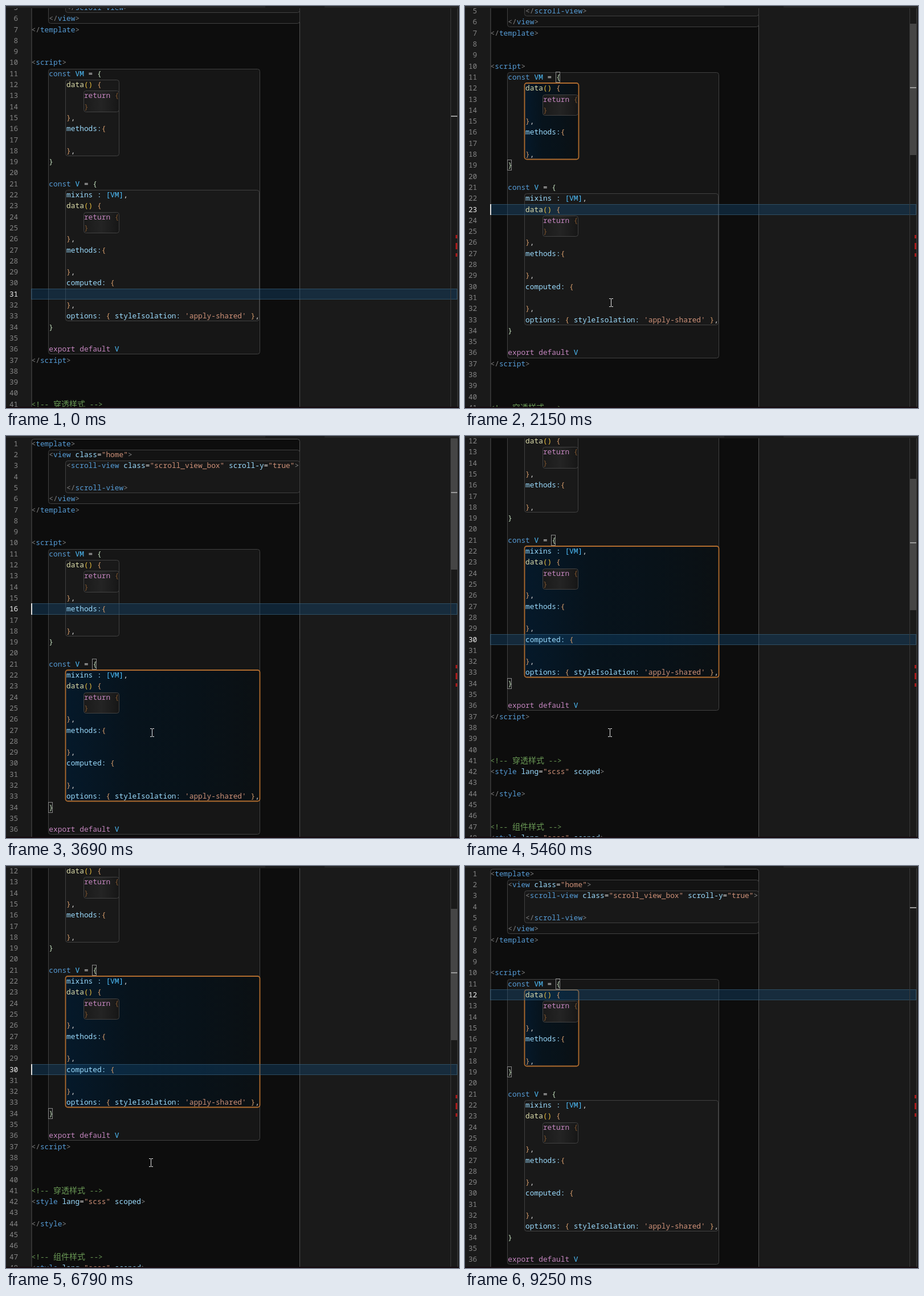
These frames come from a looping animation (795x704 px, 9.58 s). An HTML page with a canvas:

```html
<!DOCTYPE html>
<html lang="en">
<head>
<meta charset="utf-8">
<style>
html, body { margin: 0; width: 100%; height: 100%; overflow: hidden; background: #1a1a1a; }
canvas { display: block; }
</style>
</head>
<body>
<canvas id="stage" width="795" height="704"></canvas>
<script>
const ctx = document.getElementById('stage').getContext('2d');
const LOOP = 9580, W = 795, H = 704;
const LINE = 19.3, TOP = 3.85, LEFT = 44.5, CHAR = 7.7, BLINK = 533;
const MONO = '500 12.83px "Noto Sans Mono", monospace';
const CJK = '14px "Noto Sans CJK SC", "Noto Sans CJK", sans-serif';

const source = `<template>
    <view class="home">
        <scroll-view class="scroll_view_box" scroll-y="true">

        </scroll-view>
    </view>
</template>


<script>
    const VM = {
        data() {
            return {
            }
        },
        methods:{

        },
    }

    const V = {
        mixins : [VM],
        data() {
            return {
            }
        },
        methods:{

        },
        computed: {

        },
        options: { styleIsolation: 'apply-shared' },
    }

    export default V
<\/script>



<!-- 穿透样式 -->
<style lang="scss" scoped>

</style>


<!-- 组件样式 -->
<style lang="scss" scoped>`.split('\n');

const COLORS = {
  comment: '#6a9955', punct: '#808080', tag: '#569cd6', string: '#ce9178', attr: '#9cdcfe',
  flow: '#c586c0', constant: '#4fc1ff', func: '#dcdcaa', paren: '#e9bd3c', other: '#d4d4d4'
};
const BRACES = ['#c3dfbd', '#d49b6a', '#7d5530'];
const TOKEN = new RegExp([
  '(?<punct><\\/?|>)',
  '(?<tag>(?<=<\\/?)[\\w-]+|\\bconst\\b)',
  '(?<string>"[^"]*"|\'[^\']*\')',
  '(?<attr>[\\w-]+(?==)|\\bscoped\\b|\\w+\\s*:)',
  '(?<flow>\\b(?:return|export|default)\\b)',
  '(?<constant>\\bVM?\\b|[\\[\\]])',
  '(?<func>\\bdata\\b)',
  '(?<paren>[()])',
  '(?<brace>[{}])',
  '(?<other>\\S)'
].join('|'), 'g');

function tokenize(text) {
  if (text.startsWith('<!--')) {
    let x = LEFT;
    return text.split(/([\u4e00-\u9fff]+)/).map(part => {
      const wide = /[\u4e00-\u9fff]/.test(part);
      const token = { text: part, x, color: COLORS.comment, font: wide ? CJK : MONO };
      x += part.length * (wide ? 14 : CHAR);
      return token;
    });
  }
  const depth = text.search(/\S/) / 4 - 1;
  return [...text.matchAll(TOKEN)].map(m => {
    const kind = Object.keys(m.groups).find(k => m.groups[k]);
    return {
      text: m[0], x: LEFT + m.index * CHAR, font: MONO,
      color: kind === 'brace' ? BRACES[depth] : COLORS[kind]
    };
  });
}
const lines = source.map(tokenize);

// Nested blocks: left, right, first line, last line, fill
const blocks = [
  [45, 515.5, 1, 60, '#0d0d0d'],
  [74.5, 515.5, 2, 6, '#131313'],
  [104.5, 515.5, 3, 5, '#181818'],
  [74.5, 445.5, 11, 36, '#161616'],
  [104.5, 198.5, 12, 18, '#191919'],
  [104.5, 444.5, 22, 33, '#191919'],
  [136.5, 198.5, 13, 14, 'shade'],
  [136.5, 198.5, 24, 25, 'shade']
];

// Bracket pairs as [line, column], with the block that lights up
const scopes = {
  computed: { pair: [[30, 18], [32, 8]], block: null },
  VM: { pair: [[11, 15], [19, 4]], block: blocks[4] },
  V: { pair: [[21, 14], [34, 4]], block: blocks[5] }
};
const scopeOf = line => line === 31 ? scopes.computed : line < 20 ? scopes.VM : scopes.V;

// Caret jumps: time, line
const jumps = [
  [677 - 2 * BLINK, 31], [1610, 12], [2150, 23], [3220, 27], [3690, 16], [4920, 30],
  [5600, 27], [5990, 16], [6450, 27], [6790, 30], [7250, 23], [7650, 12]
];
const pointerPath = [
  [130, 626, 663], [270, 95, 446], [470, 95, 446], [800, 245, 526], [950, 256, 519],
  [4580, 256, 519], [4700, 254, 519], [8120, 254, 519], [8680, 775, 702]
];

const jumpAt = t => jumps.findLast(j => j[0] <= t) || jumps[0];
const scrollFor = line => line === 31 ? 88 : Math.max(0, (line - 1) * LINE - 342.75);

function rect(x, y, w, h, color) {
  ctx.fillStyle = color;
  ctx.fillRect(x, y, w, h);
}

function gradient(x1, x2, ...colors) {
  const g = ctx.createLinearGradient(x1, 0, x2, 0);
  colors.forEach((c, i) => g.addColorStop(i / (colors.length - 1), c));
  return g;
}

function roundBox(x1, x2, y1, y2, fill, stroke, width) {
  ctx.beginPath();
  ctx.roundRect(x1, y1, x2 - x1, y2 - y1, 4);
  ctx.fillStyle = fill;
  ctx.fill();
  ctx.strokeStyle = stroke;
  ctx.lineWidth = width;
  ctx.stroke();
}

function drawBlock([x1, x2, first, last, fill], lineTop, active) {
  const y1 = Math.round(lineTop(first) + 1) + 0.5;
  const y2 = Math.round(lineTop(last + 1) - 1.3) + 0.5;
  if (active) {
    roundBox(x1, x2 + 1, y1 - 0.5, y2, gradient(x1, x2, '#05192a', '#07131c', '#081219', '#0b1013'), '#b06c2e', 1.8);
  } else {
    const paint = fill === 'shade' ? gradient(x1, x2, '#1a1a1a', '#242424', '#161616') : fill;
    roundBox(x1, x2, y1, y2, paint, first === 1 ? '#525252' : '#414141', 1);
  }
}

function drawCode(t) {
  const [since, current] = jumpAt(t);
  const scope = scopeOf(jumpAt(t - 70)[1]);
  const scroll = scrollFor(current);
  const lineTop = n => TOP + (n - 1) * LINE - scroll;
  ctx.save();
  ctx.beginPath();
  ctx.rect(0, 4, W, H - 6);
  ctx.clip();

  blocks.forEach(b => drawBlock(b, lineTop, b === scope.block));

  const y = Math.round(lineTop(current));
  const height = Math.round(lineTop(current + 1)) - y;
  rect(44, y, 748, height, 'rgba(18, 80, 130, .34)');
  ctx.strokeStyle = 'rgba(72, 112, 138, .5)';
  ctx.lineWidth = 1;
  ctx.strokeRect(44.5, y + 0.5, 747, height - 1);

  if (t >= 200) {
    for (const [line, col] of scope.pair) {
      ctx.strokeStyle = '#888';
      ctx.strokeRect(Math.round(LEFT + col * CHAR) - 0.5, Math.round(lineTop(line)) + 0.5, 7, 18);
    }
  }

  lines.forEach((tokens, i) => {
    const base = Math.round(lineTop(i + 1) + 13.9);
    ctx.font = MONO;
    ctx.textAlign = 'right';
    ctx.fillStyle = i + 1 === current ? '#f0f0f0' : '#858585';
    ctx.fillText(i + 1, 21.3, base);
    ctx.textAlign = 'left';
    for (const token of tokens) {
      ctx.font = token.font;
      ctx.fillStyle = token.color;
      ctx.fillText(token.text, token.x, base);
    }
  });

  const blinkOn = Math.floor((t - since) / BLINK) % 2 === 0;
  if (blinkOn && t >= 470) rect(44, y, 2, height, '#e0e0e0');
  ctx.restore();
}

function drawScrollbar(t) {
  const line = jumpAt(t)[1];
  rect(780, 4, 1, H - 4, '#3a3a3a');
  if (t < 9100) {
    ctx.globalAlpha = Math.min(1, Math.max(0, (t - 130) / 140));
    rect(781, Math.round(4 + scrollFor(line) * 0.3257), 11, 230, '#454545');
    ctx.globalAlpha = 1;
  }
  rect(781, Math.round(72.4 + (line - 12) * 6.31), 11, 2, '#9a9a9a');
  for (const [y, h] of [[401, 6], [415, 11], [433, 6]]) rect(789, y, 3, h, '#a81c1c');
  rect(792, 4, 1, H - 4, '#404040');
}

function drawPointer(t) {
  const next = pointerPath.findIndex(p => p[0] > t);
  if (next < 1) return;
  const [t0, x0, y0] = pointerPath[next - 1], [t1, x1, y1] = pointerPath[next];
  const k = (t - t0) / (t1 - t0);
  const x = Math.round(x0 + (x1 - x0) * k), y = Math.round(y0 + (y1 - y0) * k);
  rect(x, y - 6, 1, 13, '#e6e6e6');
  for (const end of [-7, 7]) {
    rect(x - 3, y + end, 3, 1, '#e6e6e6');
    rect(x + 1, y + end, 3, 1, '#e6e6e6');
  }
}

function draw(now) {
  const t = now % LOOP;
  rect(0, 0, W, H, '#1a1a1a');
  drawCode(t);
  drawScrollbar(t);
  rect(0, 0, W, 3, '#262626');
  rect(455, 0, 104, 3, '#1b1b1b');
  rect(0, H - 2, W, 2, '#15090d');
  drawPointer(t);
}

const start = performance.now();
function tick() {
  draw(performance.now() - start);
  requestAnimationFrame(tick);
}
tick();
</script>
</body>
</html>
```
